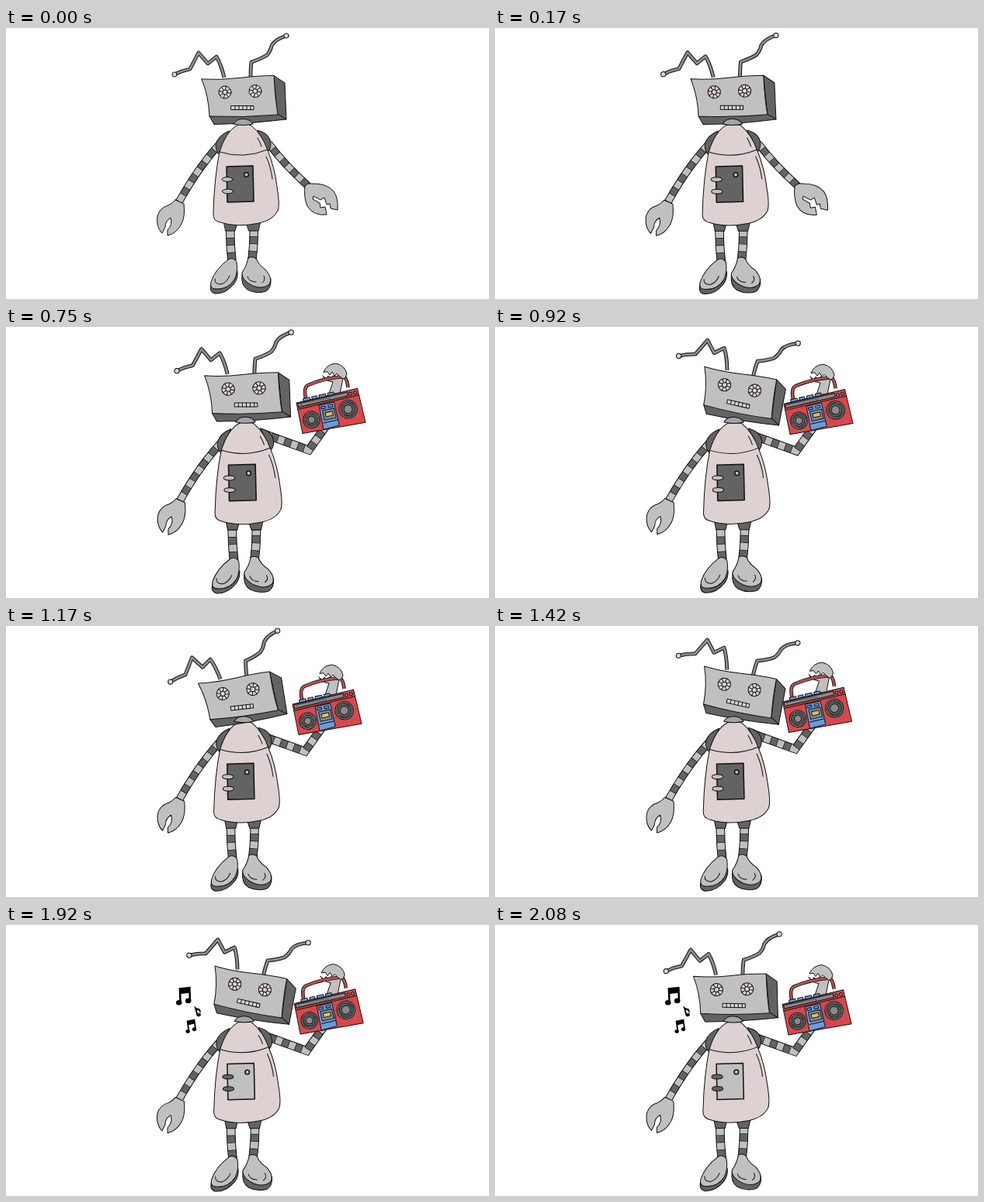
Animation, 622 px wide and 350 px high, one loop 2160 ms. Source, as an HTML page:

```html
<!DOCTYPE html>
<html lang="en">
<head>
<meta charset="utf-8">
<title>Robot with a radio</title>
<style>
  html, body { margin: 0; width: 100%; height: 100%; overflow: hidden; background: #fff; }
  svg { display: block; width: 622px; height: 350px; }
  .ink { stroke: #111; stroke-width: 1; stroke-linejoin: round; stroke-linecap: round; }
  .light { fill: #c0c0c0; }
  .dark { fill: #636363; }
  .pink { fill: #ddd1d1; }
  .line { fill: none; }
  .red { fill: #d8474b; }
  .blue { fill: #6a9bdc; }
  .mid { fill: #8a8a8a; }
</style>
</head>
<body>
<svg id="stage" viewBox="0 0 622 350" xmlns="http://www.w3.org/2000/svg"></svg>
<script>
const path = (cls, d, extra = '') => `<path class="ink ${cls}" d="${d}" ${extra}/>`;
const disc = (cls, x, y, r, ry = r, extra = '') =>
  `<ellipse class="ink ${cls}" cx="${x}" cy="${y}" rx="${r}" ry="${ry}" ${extra}/>`;
const group = (id, body, transform = '') => `<g id="${id}" transform="${transform}">${body}</g>`;
const stroke = (d, color, width, extra = '') =>
  `<path d="${d}" fill="none" stroke="${color}" stroke-width="${width}" ${extra}/>`;

// Outlined tube with dark bands
function limb(d, width, dark, light, shift = 0) {
  const gap = dark + light;
  return stroke(d, '#111', width + 1) + stroke(d, '#c0c0c0', width - 1) +
    stroke(d, '#111', width, `stroke-dasharray="${dark} ${light}" stroke-dashoffset="${shift}"`) +
    stroke(d, '#636363', width - 1,
      `stroke-dasharray="${dark - 1.4} ${gap - dark + 1.4}" stroke-dashoffset="${shift - 0.7}"`);
}

function antenna(d, x, y) {
  const join = 'stroke-linejoin="round"';
  return stroke(d, '#111', 4.8, join) + stroke(d, '#8e8e8e', 2.8, join) + disc('pink', x, y, 3.1);
}

function eye(x, y) {
  let spokes = '';
  for (let i = 0; i < 8; i++) {
    const a = i * Math.PI / 4 + 0.2, c = Math.cos(a), s = Math.sin(a);
    spokes += `M${x + 3 * c} ${y + 3 * s}L${x + 8 * c} ${y + 8 * s}`;
  }
  return disc('pink', x, y, 8) + path('line', spokes) + disc('pink', x, y, 3);
}

function speaker(x, y, r) {
  return disc('mid', x, y, r) + disc('light', x, y, r - 2) +
    disc('dark', x, y, r - 3.5) + disc('mid', x, y, r - 6.5);
}

const CLAW_DOWN = path('light',
  'M385 204Q389 200 392 201Q413 200 422 211Q428 219 427 235L418 233L417 227L413 228L410 219' +
  'L405 222L396 217L395 221L404 226L405 232L411 231L413 241Q396 243 388 230Q383 218 385 204Z');

const armDown = limb('M338 149Q360 178 389 204', 9, 9.5, 9, -9) + CLAW_DOWN;
const armUp = limb('M336 146L376.5 191L392 163', 9, 9.5, 8.5, -8) +
  group('', CLAW_DOWN, 'translate(392.5 163) rotate(-103) translate(-388 -203)');

function boombox() {
  let box = path('red', 'M0 0L85 -1L85.5 46L-1 42Z') +
    path('mid', 'M1.5 1.5L70 1L70 6L1.5 6.5Z') +
    path('light', 'M6 3L46 3.5L46 5L6 5Z', 'style="stroke-width:.5"');
  [[10, 9], [22, 7], [32, 9], [44, 8]].forEach(([x, w]) => {
    box += path('blue', `M${x} 0v-3.5h${w}v3.5Z`);
  });
  box += disc('mid', 74, 4, 2) + disc('mid', 80.5, 4, 2) +
    path('line', 'M0 9L85 8') +
    path('blue', 'M29 10H50V42L28 43Z') +
    path('mid', 'M32 18H48V31H32Z') +
    path('', 'M35 21.5H45V27H35Z', 'fill="#d9bd6b"') +
    path('blue', 'M31 12.5h6v3h-6ZM41 12.5h6v3h-6Z') +
    path('line', 'M30 34.5H49') +
    speaker(15, 26.5, 11.3) + speaker(66.5, 23.5, 12.3);
  return group('', box, 'translate(374 98) rotate(-12.7) scale(.95 .96)');
}

const HANDLE = 'M386 92Q383 78 389 75Q410 66 434 64Q439 65 440.500 78';
const UPPER_JAW = 'M409 58Q413 48 425 47Q437 50 439 61Q438 66 434 67L430 64L426 60L423 63' +
  'L420 58L417 62L414 58Z';
const LOWER_JAW = 'M408 63L412 67L415 63L418 67L421 63L425 66L434 66L430 86L416 86L421 71Q411 70 408 63Z';
const armRadio = limb('M332 138L390 159L412 128', 10, 9.5, 8.5, -10) +
  path('light', LOWER_JAW) +
  stroke(HANDLE, '#111', 4.6) + stroke(HANDLE, '#b5514e', 2.8) +
  path('light', UPPER_JAW) +
  boombox();

const legs =
  limb('M289 252Q288 275 291 301', 10.5, 10, 9, 0) +
  limb('M319 250Q320 275 317 299', 10.5, 10, 9, 0) +
  path('dark', 'M281 252L297 254L295 262L283 262ZM310 253L328 249L325 262L313 262Z') +
  path('dark', 'M264 331Q261 341 269 343Q283 344 294 330Q299 323 298 314Z') +
  path('light', 'M286 299Q292 295 297 302Q299 316 294 325Q286 338 270 337Q262 337 264 328Q269 312 286 299Z') +
  path('dark', 'M304 318Q302 332 311 338Q323 344 335 340Q342 335 341 324Z') +
  path('light', 'M312 297Q317 294 322 298Q325 306 334 312Q344 323 339 331Q330 338 318 333Q303 326 304 316Q310 308 312 297Z') +
  path('line', 'M269 324Q268 331 277 331Q285 328 288 320M311 321Q313 328 322 328M330 329Q335 325 332 320');

const leftArm = limb('M274 151Q247 181 222 226', 9, 10.5, 9.5, -9) +
  path('light', 'M218 222L229 227Q231 243 226 253Q220 265 208 268L208 261Q215 254 212 245' +
    'Q205 249 205 257L201 265Q193 257 195 243Q198 232 209 229Q215 226 218 222Z');

const door =
  path('dark', 'M284 179L318 178L319 224L285 225Z', 'id="panel" style="stroke-width:1.5"') +
  disc('light', 309.5, 189.5, 2.8, 2.8, 'style="stroke-width:1.5"') +
  disc('light hinge', 285, 195.5, 7, 2.9) + disc('light hinge', 285.5, 211, 7, 2.9);

const torso =
  path('dark', 'M287 133Q273 139 270 150Q270 160 275 164L283 143Z') +
  path('dark', 'M324 132Q340 136 341 149Q341 157 337 160L330 144Z') +
  path('pink', 'M275 160Q283 134 297 126Q306 121 316 126Q330 138 337 158Q346 180 349 205' +
    'Q353 229 350 236Q344 248 326 252Q298 258 276 251Q266 249 267 239Q268 195 275 160Z') +
  path('line', 'M275 160Q306 170 337 157M324 142Q327 147 329 153M335 166Q341 179 343 195') +
  door;

let teeth = '';
for (let x = 295; x < 319; x += 5) teeth += `M${x} 100.5v5`;
const head =
  antenna('M281 64Q277 47 271 37L260 46L248 32L237 53Q227 55 217 60', 217, 60) +
  antenna('M315 64Q315 52 316 44Q328 40 336 35Q341 29 342 23Q346 15 361 10', 361, 10) +
  path('dark', 'M345 61.500L359 71L361 118L350 112Z') +
  path('dark', 'M262 114L268 124.5Q315 124 361 118L350 111Z') +
  path('light', 'M252 66Q275 67.500 300 64.500Q325 61.500 345 61.500Q346 88 350 112Q305 116 262 114Q261 88 252 66Z') +
  eye(282, 83) + eye(321, 81.5) +
  path('pink', 'M290 100.500H319V105.500H290Z') + path('line', teeth);

const neck = path('', 'M293 124Q297 117 306 117.5Q315 118 318 124Q306 127 293 124Z', 'fill="#a3a3aa"');

const PAIR = '<path d="M-6 -11L9 -12V6H6.5V-4L-3.5 -3V8H-6Z"/>' +
  '<ellipse cx="-6.5" cy="8" rx="3.8" ry="3.3"/><ellipse cx="5.5" cy="6" rx="3.8" ry="3.3"/>';
const SINGLE = '<path d="M-1 -8Q1 -3 5 -2Q7 2 4 5Q5 1 1 -1V6H-1Z"/>' +
  '<ellipse cx="2" cy="6" rx="2.8" ry="2.2"/>';

document.getElementById('stage').innerHTML =
  group('radio', armRadio) +
  group('robot', legs + leftArm + group('down', armDown) + group('up', armUp) +
    torso + group('head', head) + neck) +
  group('notes', group('n0', PAIR) + group('n1', SINGLE) + group('n2', PAIR));

const LOOP = 2160, STEPS = 26;
const $ = id => document.getElementById(id);

// step, scale x, scale y, shift x, shift y, radio x, radio y
const SWAY = [
  [0, 1, 1, 0, 0, 0, 0],
  [5, 1.02, 1.007, -1, 0.3, 0, 0],
  [9, 1.02, 1.01, 0.8, -0.5, 0, 0],
  [14, 1.003, 1, 0.5, -0.8, -5, 3],
  [17, 1.012, 1, 0.5, -0.8, -3.5, 0],
  [20, 1.017, 1.007, -0.8, 0.8, -1, 2],
  [25, 1.007, 1, 0.5, 0.4, -4, 4.5]
];

// shift x, shift y, tilt; one digit of TILTS per step
const HEADS = [
  [0, 0, 0], [2.3, -1, 0.7], [1.5, -1, 0.3], [0.5, 2.3, -6.5],
  [2.7, -2.2, 13], [1, -1, -8.4], [1.7, 0.6, 0.9]
];
const TILTS = '00001111222443334445554466';

// x, y, turn, scale for each note
const NOTES = [
  [[203, 114, 38, 0.86], [224, 126, -40, 0.9], [224, 146, 35, 0.58]],
  [[229, 92, -2, 1], [245, 111, -15, 0.95], [238, 131, -8, 0.72]]
];

function swayAt(step) {
  const i = Math.min(SWAY.length - 2, SWAY.findLastIndex(row => row[0] <= step));
  const a = SWAY[i], b = SWAY[i + 1], p = (step - a[0]) / (b[0] - a[0]);
  return a.map((v, n) => v + (b[n] - v) * p).slice(1);
}

function stepAt(time) {
  let step = 0;
  while (step + 1 < STEPS && Math.round((step + 1) * 25 / 3) * 10 <= time) step++;
  return step;
}

function show(id, on) { $(id).style.display = on ? '' : 'none'; }
function move(id, transform) { $(id).setAttribute('transform', transform); }

function draw(step) {
  const [sx, sy, tx, ty, rx, ry] = swayAt(step);
  move('robot', `translate(${200 + tx} ${200 + ty}) scale(${sx} ${sy}) translate(-200 -200)`);
  move('radio', `translate(${rx} ${ry})`);
  const [hx, hy, tilt] = HEADS[TILTS[step]];
  move('head', `translate(${hx} ${hy}) rotate(${tilt} 307 120)`);

  show('down', step < 4);
  show('up', step >= 4 && step < 8);
  show('radio', step >= 8);

  const music = step >= 18;
  show('notes', music);
  $('panel').setAttribute('class', 'ink ' + (music ? 'light' : 'dark'));
  document.querySelectorAll('.hinge').forEach(h =>
    h.setAttribute('class', 'ink hinge ' + (music ? 'dark' : 'light')));
  NOTES[step < 23 ? 0 : 1].forEach(([x, y, turn, size], i) =>
    move('n' + i, `translate(${x} ${y}) rotate(${turn}) scale(${size})`));
}

let start = null, last = 0;
function tick(now) {
  if (start === null) start = now;
  const step = stepAt((now - start) % LOOP);
  if (step !== last) draw(last = step);
  requestAnimationFrame(tick);
}
draw(0);
requestAnimationFrame(tick);
</script>
</body>
</html>
```
